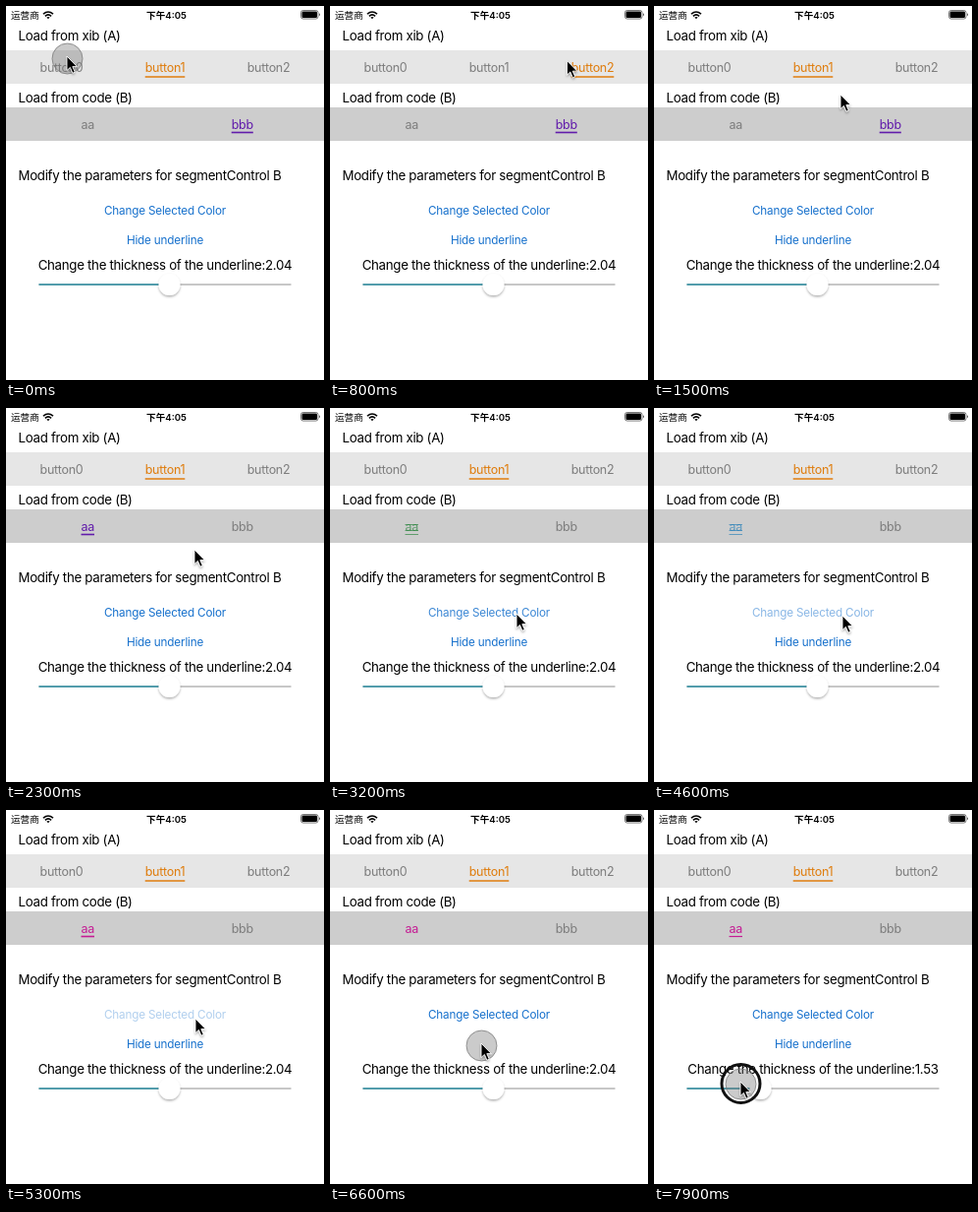
An HTML page for the animation above (8000 ms loop, 324x380 px).

```html
<!DOCTYPE html>
<html lang="en">
<head>
<meta charset="utf-8">
<title>Segment control demo</title>
<style>
  html, body { margin: 0; width: 100%; height: 100%; overflow: hidden; background: #fff; }
  svg { display: block; width: 324px; height: 380px; }
  text { font-family: Inter, "Noto Sans CJK SC", "Noto Sans CJK", sans-serif; font-size: 13.3px; letter-spacing: -.023em; }
  .mid { text-anchor: middle; }
  .seg { font-size: 12.5px; }
  .link { font-size: 11.7px; letter-spacing: -.014em; fill: #1670cc; }
  .status { font-size: 9.6px; letter-spacing: 0; }
</style>
</head>
<body>
<svg viewBox="0 0 324 380">
  <defs>
    <filter id="soft" x="-50%" y="-50%" width="200%" height="200%">
      <feDropShadow dx="0" dy="1.5" stdDeviation="1.3" flood-opacity=".32"/>
    </filter>
  </defs>
  <rect width="324" height="380" fill="#fff"/>

  <text class="status" x="5" y="12.5">运营商</text>
  <g fill="none" stroke="#000" stroke-width="1.6">
    <path d="M38 8.2Q43 3.8 48 8.2M39.9 10.3Q43 7.6 46.1 10.3"/>
    <path d="M41.4 11.5L43 13.2 44.6 11.5Q43 10.3 41.4 11.5Z" fill="#000" stroke="none"/>
  </g>
  <text class="status mid" x="163.5" y="12.5" font-weight="600">下午4:05</text>
  <rect x="300.5" y="4.5" width="17.5" height="8.5" rx="2.2" fill="#fff" stroke="#555" stroke-width=".8"/>
  <rect x="301.5" y="5.5" width="15.5" height="6.5" rx="1.3" fill="#000"/>
  <path d="M319 7.2Q321 8.7 319 10.2Z" fill="#555"/>

  <rect y="45" width="324" height="34" fill="#e6e6e6"/>
  <rect y="103" width="324" height="34" fill="#cdcdcd"/>
  <text x="12.5" y="35">Load from xib (A)</text>
  <text x="12.5" y="98">Load from code (B)</text>
  <text x="12.5" y="177">Modify the parameters for segmentControl B</text>
  <g id="segments"></g>

  <text id="recolor" class="link mid" x="162" y="211.5">Change Selected Color</text>
  <text id="toggle" class="link mid" x="162" y="241.5"></text>
  <text id="label" class="mid" x="162" y="268"></text>

  <path d="M33.5 283H290.5" stroke="#b4b4b4" stroke-width="1.5"/>
  <path id="fill" stroke="#2c8fa3" stroke-width="1.6"/>
  <circle id="thumb" cy="283" r="11" fill="#fff" filter="url(#soft)"/>

  <g id="pointer">
    <g id="touch">
      <circle cx=".5" cy="2.5" r="15.5" fill="#777" fill-opacity=".38" stroke="#777" stroke-opacity=".75"/>
      <circle id="ring" cx=".5" cy="2" r="19.5" fill="none" stroke="#111" stroke-width="3"/>
    </g>
    <path d="M0 0V14.5L3.4 11.4 5.9 17.2 8.3 16.2 5.8 10.6H10.4Z" fill="#000" stroke="#fff" stroke-width=".9" filter="url(#soft)"/>
  </g>
</svg>
<script>
const LOOP = 8000, STEP = 100, HOLD = 80, LAG = 50, FADE = 150;
const DRAG = 7400, DRAG_X = 146, THUMB_X = 166.5;
const palette = ['#611bab', '#27823b', '#e9a13b', '#267fb8', '#c51c94'];

const $ = id => document.getElementById(id);
const set = (el, attrs) => { for (const k in attrs) el.setAttribute(k, attrs[k]); };
const clamp = v => Math.min(1, Math.max(0, v));
const ease = k => k * k * (3 - 2 * k);
const make = (tag, attrs) => {
  const el = document.createElementNS('http://www.w3.org/2000/svg', tag);
  set(el, attrs);
  return $('segments').appendChild(el);
};

// Segments spread evenly around the stage centre.
const makeBar = (names, gap, y, drop) => names.map((name, i) => {
  const x = 162 + gap * (i - (names.length - 1) / 2);
  const text = make('text', { class: 'seg mid', x, y });
  text.textContent = name;
  return { text, line: make('path', {}), x, y, drop };
});
const barA = makeBar(['button0', 'button1', 'button2'], 105.5, 66.5, 5.5);
const barB = makeBar(['aa', 'bbb'], 157.5, 124.5, 4);

// The pointer's stops; those with an action are taps.
const stop = (time, x, y, action, arg) => ({ time, x, y, action, arg });
const stops = [
  stop(0, 62, 51, 'a', 0),
  stop(600, 268, 57, 'a', 2),
  stop(1100, 175, 52, 'a', 1),
  stop(1500, 190, 90),
  stop(1700, 70, 107, 'b', 0),
  stop(2300, 192, 144),
  ...[0, 1, 2, 3].map(i => stop(3075 + 725 * i, 190 + i, 209 + i, 'color', i + 1)),
  stop(5900, 154, 237, 'hidden', true),
  stop(6600, 154, 237, 'hidden', false),
  stop(DRAG, DRAG_X, 276),
  stop(7900, 88, 276)
];
const taps = stops.filter(s => s.action);

function pointerAt(t) {
  const i = stops.findIndex(s => s.time > t);
  if (i < 0) return stops[stops.length - 1];
  const a = stops[i - 1], b = stops[i];
  const k = ease(clamp((t - a.time - HOLD) / (b.time - a.time - 2 * HOLD)));
  return { x: a.x + (b.x - a.x) * k, y: a.y + (b.y - a.y) * k };
}

function stateAt(t) {
  const state = { a: 1, b: 1, color: 0, hidden: false };
  for (const s of taps) if (t >= s.time + LAG) state[s.action] = s.arg;
  return state;
}

// Link titles dip to nothing at each tap.
const linkAlpha = (t, action) => Math.min(1, ...taps
  .filter(s => s.action === action).map(s => Math.abs(t - s.time) / FADE));

function drawBar(bar, chosen, color, thick, ghost = false) {
  bar.forEach(({ text, line, x, y, drop }, i) => {
    const on = i === chosen, w = text.getComputedTextLength();
    const row = dy => `M${x - w / 2} ${y + dy}h${w}`;
    const alpha = ghost ? .65 : 1;
    set(text, { fill: on ? color : '#7d7d7d', opacity: on ? alpha : 1 });
    set(line, {
      d: ghost ? row(-6) + row(0) + row(drop) : row(drop),
      stroke: color, 'stroke-width': ghost ? 1 : thick, opacity: on && thick ? alpha : 0
    });
  });
}

function draw(t) {
  const { x, y } = pointerAt(t);
  const state = stateAt(t);
  const drag = t < DRAG ? 0 : DRAG_X - x;
  const value = 2.04 - drag * .0088;
  const ghost = taps.some(s => s.action === 'color' && t - s.time > LAG && t - s.time < FADE);

  drawBar(barA, state.a, '#df7c0c', 1.6);
  drawBar(barB, state.b, palette[state.color], state.hidden ? 0 : value * .8, ghost);

  set($('recolor'), { opacity: linkAlpha(t, 'color') });
  set($('toggle'), { opacity: linkAlpha(t, 'hidden') });
  $('toggle').textContent = state.hidden ? 'Show underline' : 'Hide underline';
  $('label').textContent = 'Change the thickness of the underline:' + value.toFixed(2);
  set($('fill'), { d: `M33.5 283H${THUMB_X - drag}` });
  set($('thumb'), { cx: THUMB_X - drag });

  const down = t >= DRAG || taps.some(s => t >= s.time - 100 && t < s.time);
  const fresh = taps.some(s => t >= s.time && t < s.time + LAG);
  set($('pointer'), { transform: `translate(${x} ${y})` });
  set($('touch'), { opacity: down || fresh ? 1 : 0 });
  set($('ring'), { opacity: down ? 1 : 0 });
}

function tick() {
  const t = performance.now() % LOOP;
  draw(Math.floor(t / STEP) * STEP);
  requestAnimationFrame(tick);
}
tick();
</script>
</body>
</html>
```
